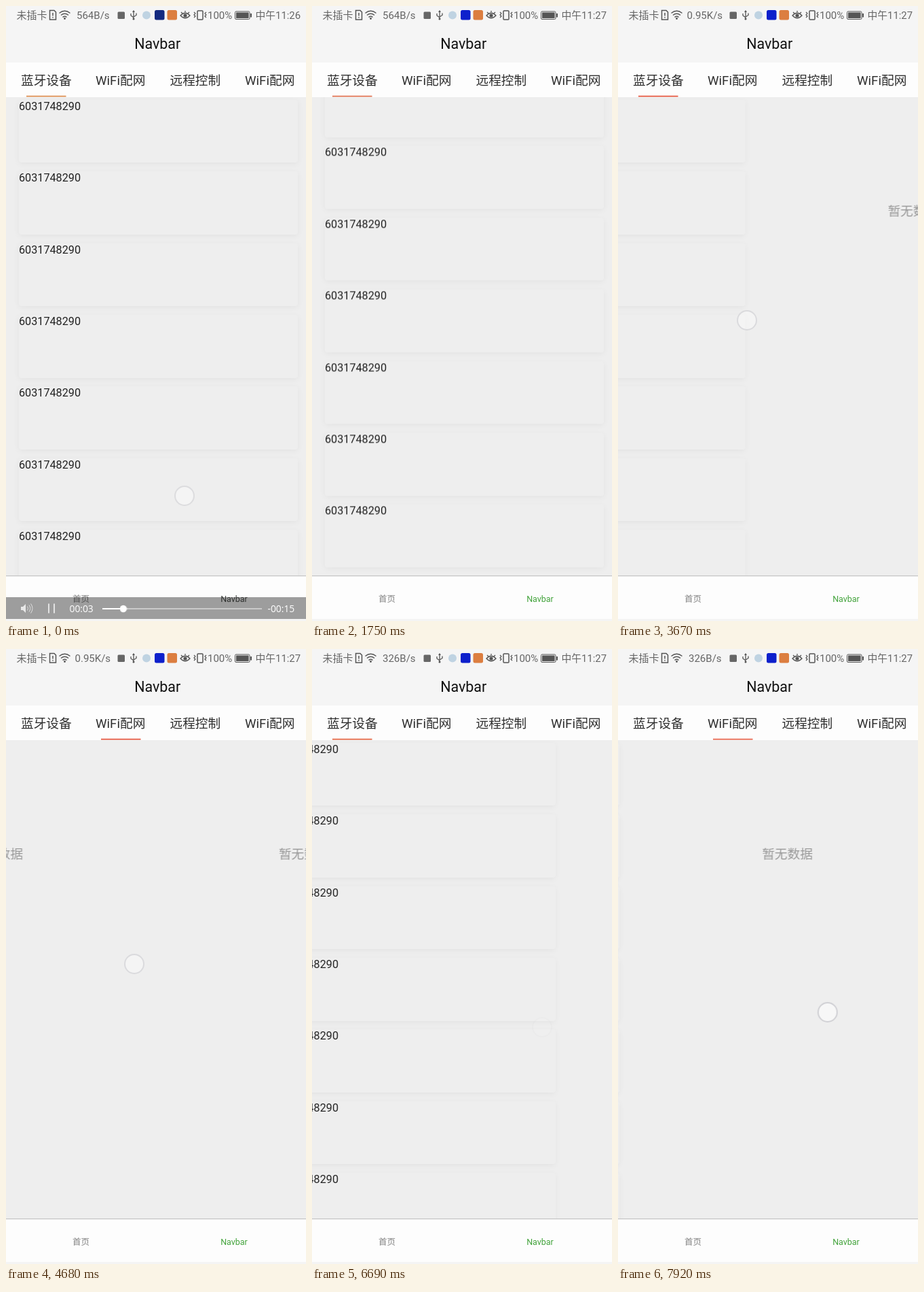
An HTML page for the animation above (8 s loop, 442 by 904 pixels).

```html
<!DOCTYPE html>
<html lang="zh-CN">
<head>
<meta charset="utf-8">
<title>Navbar</title>
<style>
html, body { margin: 0; width: 100%; height: 100%; overflow: hidden; }
body { position: relative; background: #eee; font-family: Roboto, "Noto Sans CJK SC", "Noto Sans CJK", sans-serif; }
svg, .view, .pager, .list, .touch { position: absolute; left: 0; top: 0; }
.chrome { width: 442px; height: 904px; }
.view { top: 134px; width: 442px; height: 703px; overflow: hidden; }

/* Every part shares one 8 s clock */
.pager, .list, .touch, .line, .player, .played, .knob, .badge, .nav, .swap { animation: 8s linear infinite; }
.swap, .line, .badge, .nav { animation-timing-function: step-end; }

.pager { width: 451.5px; height: 703px; animation-name: page; }
.list { width: 451.5px; animation-name: scroll; }
.card {
  position: absolute; left: 19px; width: 411px; height: 92.6px; border-radius: 4px;
  background: #eee; box-shadow: 0 2px 10px rgba(0, 0, 0, .05);
  font-size: 16.2px; line-height: 19.5px; color: #222;
}
.empty { position: absolute; top: 154px; width: 451.5px; text-align: center; font-size: 18.7px; line-height: 28px; color: #999; }
.touch {
  box-sizing: border-box; width: 30px; height: 30px; margin: -15px; border-radius: 50%;
  border: 2px solid rgba(195, 195, 200, .75); background: rgba(255, 255, 255, .55);
  animation-name: move, fade;
}

.status { font-size: 15px; fill: #666; }
.tabs { font-size: 18.7px; fill: #2e2e2e; }
.line { animation-name: tab; }
.badge { animation-name: badge; }
.nav { animation-name: nav; }
.player { animation-name: player; font: 13.8px "Open Sans", sans-serif; fill: #fff; }
.played { animation-name: played; transform-origin: 142px 0; }
.knob { animation-name: knob; }
.min1 { animation-name: min1; }  .min2 { animation-name: min2; }
.net1 { animation-name: net1; }  .net2 { animation-name: net2; }  .net3 { animation-name: net3; }
.sec1 { animation-name: sec1; }  .sec2 { animation-name: sec2; }

@keyframes scroll {
  0%, .875% { transform: translateY(0); animation-timing-function: cubic-bezier(.3, .2, .45, 1); }
  10.375% { transform: translateY(-353.7px); }
  29.625% { transform: translateY(-353.7px); animation-timing-function: cubic-bezier(.4, .1, .75, .8); }
  34.375% { transform: translateY(-78.4px); animation-timing-function: cubic-bezier(.3, .5, .5, 1); }
  37.25%, 100% { transform: translateY(0); }
}
@keyframes page {
  0%, 41.125% { transform: translateX(0); animation-timing-function: ease-in; }
  45% { transform: translateX(-165px); animation-timing-function: cubic-bezier(.25, .5, .6, 1); }
  50.75% { transform: translateX(-438px); }
  51.625%, 53.75% { transform: translateX(-451.5px); animation-timing-function: ease-in; }
  57.5% { transform: translateX(-610px); }
  58.5% { transform: translateX(-688.5px); animation-timing-function: cubic-bezier(.25, .5, .55, 1); }
  63.375% { transform: translateX(-896px); }
  64.25%, 66.375% { transform: translateX(-903px); animation-timing-function: ease-in; }
  70% { transform: translateX(-690px); }
  71.125% { transform: translateX(-577.5px); animation-timing-function: cubic-bezier(.2, .6, .5, 1); }
  76%, 77.5% { transform: translateX(-451.5px); animation-timing-function: ease-in; }
  81.75% { transform: translateX(-270px); }
  83.625% { transform: translateX(-72px); animation-timing-function: cubic-bezier(.2, .6, .5, 1); }
  86.5%, 88% { transform: translateX(0); animation-timing-function: ease-in; }
  92% { transform: translateX(-180px); animation-timing-function: cubic-bezier(.25, .5, .6, 1); }
  97.125% { transform: translateX(-365.5px); }
  99% { transform: translateX(-427.5px); }
  100% { transform: translateX(-445px); }
}
@keyframes move {
  0%, .875% { transform: translate(263px, 720px); }
  6.5%, 14.25% { transform: translate(270.5px, 455.5px); }
  14.26% { transform: translate(278px, 640px); }
  20%, 29.6% { transform: translate(271.5px, 405.5px); }
  29.61% { transform: translate(276px, 300px); }
  34.375% { transform: translate(286.5px, 583.5px); }
  37.25%, 41% { transform: translate(309px, 649px); }
  41.01% { transform: translate(385px, 470px); }
  45%, 53.5% { transform: translate(190px, 462px); }
  53.51% { transform: translate(380px, 455px); }
  57.5% { transform: translate(195px, 463px); }
  58.5%, 66.2% { transform: translate(189px, 463px); }
  66.21% { transform: translate(110px, 505px); }
  71.125%, 77.4% { transform: translate(349px, 539.5px); }
  77.41% { transform: translate(120px, 520px); }
  81.75%, 87.9% { transform: translate(339px, 556px); }
  87.91% { transform: translate(350px, 540px); }
  92%, 96.4% { transform: translate(165px, 525px); }
  96.41% { transform: translate(378px, 556px); }
  97.125% { transform: translate(371px, 554px); }
  99% { transform: translate(309px, 534px); }
  100% { transform: translate(290px, 528px); }
}
@keyframes fade {
  0%, 6.5% { opacity: .6; }
  10.375%, 14.2% { opacity: .15; }
  14.25% { opacity: 0; }
  15%, 20% { opacity: .9; }
  21.875%, 29.6% { opacity: 0; }
  30.5%, 37.25% { opacity: 1; }
  39.25%, 41% { opacity: 0; }
  42%, 45% { opacity: 1; }
  47.5%, 53.5% { opacity: 0; }
  54.5%, 57.5% { opacity: 1; }
  58.5% { opacity: .65; }
  60.5%, 66.2% { opacity: 0; }
  67%, 70% { opacity: 1; }
  71.125% { opacity: .6; }
  73%, 77.4% { opacity: 0; }
  78.5%, 81.5% { opacity: .9; }
  83.625% { opacity: .1; }
  85%, 87.9% { opacity: 0; }
  89%, 92% { opacity: 1; }
  94%, 96.4% { opacity: 0; }
  97.2%, 100% { opacity: 1; }
}
@keyframes tab {
  0% { transform: none; fill: #dc8b4c; }
  8% { transform: none; fill: #e0714f; }
  30% { transform: none; fill: #e4533b; }
  47% { transform: translateX(110px); fill: #e4533b; }
  59.5% { transform: translateX(219.5px); fill: #e4533b; }
  70.6% { transform: translateX(110px); fill: #e8593f; }
  82.5% { transform: none; fill: #e4623e; }
  93.25%, 100% { transform: translateX(110px); fill: #e8624a; }
}
@keyframes badge { 0% { fill: #142a80; } 17%, 100% { fill: #0d20cc; } }
@keyframes nav { 0% { fill: #4a4d4a; } 16%, 100% { fill: #43a33c; } }
@keyframes player { 0%, 14.25% { opacity: 1; } 17.5%, 100% { opacity: 0; } }
@keyframes played { 0% { transform: scaleX(30.5); } 12.375% { transform: scaleX(41.5); } 17.5%, 100% { transform: scaleX(46); } }
@keyframes knob { 0% { transform: translateX(30.5px); } 12.375% { transform: translateX(41.5px); } 17.5%, 100% { transform: translateX(46px); } }
@keyframes min1 { 0% { opacity: 1; } 5%, 100% { opacity: 0; } }
@keyframes min2 { 0% { opacity: 0; } 5%, 100% { opacity: 1; } }
@keyframes net1 { 0% { opacity: 1; } 30.6%, 100% { opacity: 0; } }
@keyframes net2 { 0% { opacity: 0; } 30.6% { opacity: 1; } 68%, 100% { opacity: 0; } }
@keyframes net3 { 0% { opacity: 0; } 68%, 100% { opacity: 1; } }
@keyframes sec1 { 0% { opacity: 1; } 7.5%, 100% { opacity: 0; } }
@keyframes sec2 { 0% { opacity: 0; } 7.5%, 100% { opacity: 1; } }
</style>
</head>
<body>
<div class="view">
  <div class="pager">
    <div class="list"></div>
    <div class="empty" style="left:451.5px">暂无数据</div>
    <div class="empty" style="left:903px">暂无数据</div>
  </div>
</div>

<svg class="chrome" viewBox="0 0 442 904">
  <rect width="442" height="83" fill="#f5f5f5"/>
  <rect y="83" width="442" height="51" fill="#fdfdfd"/>
  <rect y="837" width="442" height="64" fill="#fdfdfd"/>
  <rect y="837" width="442" height="1.3" fill="#c6c6c6"/>
  <rect y="901" width="442" height="3" fill="#f4f4f4"/>

  <g class="status">
    <text x="15.5" y="19">未插卡</text>
    <g class="swap net1"><text x="104" y="19">564B/s</text></g>
    <g class="swap net2"><text x="101.5" y="19">0.95K/s</text></g>
    <g class="swap net3"><text x="104" y="19">326B/s</text></g>
    <text x="297" y="19">100%</text>
    <g font-size="14.8">
      <g class="swap min1"><text x="367.5" y="19">中午11:26</text></g>
      <g class="swap min2"><text x="367.5" y="19">中午11:27</text></g>
    </g>
    <rect x="164.5" y="8.5" width="10.5" height="10.5" rx="1.5"/>
    <circle cx="207" cy="13.5" r="6" fill="#bfd3e2"/>
    <rect class="badge" x="219" y="6" width="14.5" height="14.5" rx="2.5"/>
    <rect x="237.5" y="6" width="14.5" height="14.5" rx="2.5" fill="#dc7e40"/>
    <g fill="none" stroke="#555" stroke-width="1.5">
      <path d="M64.5 6.5H71L73.5 9V20H64.5ZM69 10v4.5M69 16v1.5"/>
      <path d="M78.5 10.5Q86.5 4 94.5 10.5M81 13.5Q86.5 9 92 13.5M83.5 16.5Q86.5 14 89.5 16.5"/>
      <path d="M188 7.5V20M184 11v3l4 3M192 10.5v3l-4 2.5" stroke-width="1.3"/>
      <path d="M257 14Q264 6.5 271 14Q264 21.5 257 14ZM258 9l2 2M264 7v2M270 9l-2 2" stroke-width="1.3"/>
      <rect x="282" y="7" width="8" height="13" rx="1"/>
      <path d="M277 9l2 2-2 2 2 2-2 2M295 9l-2 2 2 2-2 2 2 2" stroke-width="1.2"/>
      <rect x="337.5" y="8" width="21.5" height="11.5" rx="1.5" stroke-width="1"/>
    </g>
    <g fill="#555">
      <circle cx="86.5" cy="18.5" r="1.4"/>
      <circle cx="264" cy="14" r="2.6"/>
      <rect x="339" y="9.5" width="18.5" height="8.5"/>
      <rect x="360" y="11" width="2" height="5.5"/>
      <path d="M186 9l2-3 2 3z"/>
      <circle cx="188" cy="19" r="1.5"/>
    </g>
  </g>

  <text x="223.2" y="63" font-size="21.4" text-anchor="middle" fill="#111">Navbar</text>
  <g class="tabs">
    <text x="22" y="116">蓝牙设备</text>
    <text x="132" y="116">WiFi配网</text>
    <text x="241.5" y="116">远程控制</text>
    <text x="352" y="116">WiFi配网</text>
  </g>
  <rect class="line" x="30" y="131.8" width="58.5" height="1.7"/>

  <g font-size="12.5" text-anchor="middle">
    <text x="110.5" y="876" fill="#858585">首页</text>
    <text class="nav" x="336" y="876">Navbar</text>
  </g>
</svg>

<div class="touch"></div>

<svg class="chrome" viewBox="0 0 442 904">
  <g class="player">
    <rect y="869" width="442" height="32" fill="#000" fill-opacity=".38"/>
    <path d="M22 883h3l4-4v13l-4-4h-3z" fill="#e8e8e8"/>
    <path d="M31.5 882.5q2 3 0 6M34 880.5q3.5 5 0 10M36.5 878.5q5 7 0 14" fill="none" stroke="#ddd"/>
    <path d="M63 878.5v14M71 878.5v14" stroke="#fff" stroke-width="1.4"/>
    <rect x="142" y="885" width="235" height="2" fill="#c9c9c9"/>
    <rect class="played" x="142" y="885" width="1" height="2"/>
    <circle class="knob" cx="142.3" cy="886" r="5.2"/>
    <g class="swap sec1"><text x="93.5" y="891">00:03</text><text x="385.5" y="891">-00:15</text></g>
    <g class="swap sec2"><text x="93.5" y="891">00:04</text><text x="385.5" y="891">-00:14</text></g>
  </g>
</svg>

<script>
const list = document.querySelector('.list');
for (let i = 0; i < 10; i++) {
  const card = document.createElement('div');
  card.className = 'card';
  card.style.top = 3.8 + i * 105.4 + 'px';
  card.textContent = '6031748290';
  list.append(card);
}
</script>
</body>
</html>
```
